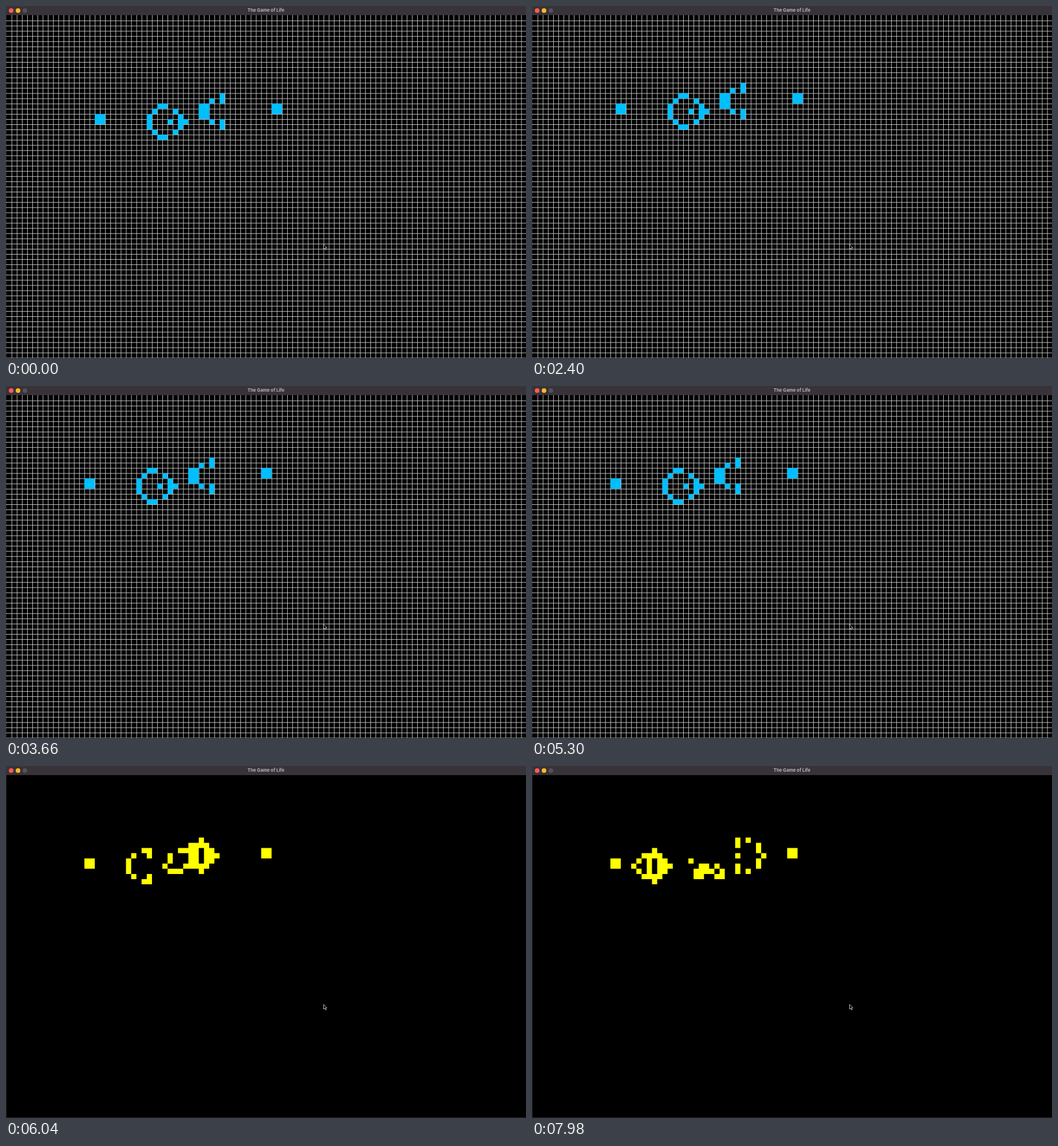
An HTML page with a canvas that plays this animation: 908 px wide and 616 px high, repeating every 8000 ms.

```html
<!DOCTYPE html>
<html lang="en">
<head>
<meta charset="utf-8">
<title>The Game of Life</title>
<style>
  html, body { margin: 0; width: 100%; height: 100%; overflow: hidden; background: #000; }
  canvas { display: block; }
  .bar {
    position: absolute; left: 0; top: 0; width: 908px; height: 16px;
    background: #383239; color: #b9b4b9;
    font: 700 7.8px/15px Inter, "Open Sans", sans-serif; text-align: center;
  }
  .bar i { position: absolute; top: 4px; width: 7.6px; height: 7.6px; border-radius: 50%; }
  svg { position: absolute; left: 553px; top: 416px; }
</style>
</head>
<body>
<canvas width="908" height="616"></canvas>
<div class="bar">
  <i style="left:5.2px;background:#ff5b51"></i>
  <i style="left:17.2px;background:#fcb827"></i>
  <i style="left:29.2px;background:#565156"></i>
  The Game of Life
</div>
<svg width="9" height="13" viewBox="0 0 9 13">
  <path d="M1.5 1.2V9.4L3.4 7.8L4.8 10.8L6.3 10.1L4.9 7.2H7.3Z" fill="#000" stroke="#e8e8e8" stroke-width=".8"/>
</svg>
<script>
const WIDTH = 908, HEIGHT = 616, BAR = 16;
const LOOP = 8000, RUN_AT = 5340, TICK = 200;
const CELL = 9.08, LEFT = 0.66, TOP = 16.38, LINE = 0.9;
const NUDGES = [640, 1040, 1360, 2860, 3460]; // alternately up and left
const ctx = document.querySelector('canvas').getContext('2d');

function rect(x, y, w, h) {
  return Array.from({ length: w * h }, (_, i) => [x + i % w, y + Math.floor(i / w)]);
}

// Circle of radius 3 with a gap right of its top and bottom
function ring(cx, cy) {
  return rect(-3, -3, 7, 7)
    .filter(([x, y]) => Math.round(Math.hypot(x, y)) === 3 && !(x === 1 && Math.abs(y) === 3))
    .map(([x, y]) => [cx + x, cy + y]);
}

function gliderGun() {
  const arm = side => [[22, 3 + 2 * side], [24, 3 + 2 * side], [24, 3 + 3 * side]];
  return [
    ...rect(0, 4, 2, 2), ...rect(34, 2, 2, 2),
    ...ring(13, 5), [14, 5], [17, 5],
    ...rect(20, 2, 2, 3), ...arm(-1), ...arm(1)
  ];
}

function evolve(cells) {
  const counts = new Map(), live = new Set(cells.map(String));
  for (const [x, y] of cells)
    for (const [nx, ny] of rect(x - 1, y - 1, 3, 3))
      if (nx !== x || ny !== y) {
        const key = `${nx},${ny}`;
        counts.set(key, (counts.get(key) || 0) + 1);
      }
  return [...counts]
    .filter(([key, n]) => n === 3 || (n === 2 && live.has(key)))
    .map(([key]) => key.split(',').map(Number));
}

const generations = [gliderGun()];
while (generations.length <= (LOOP - RUN_AT) / TICK + 1) generations.push(evolve(generations.at(-1)));

function drawGrid() {
  ctx.fillStyle = '#d4d4d4';
  for (let x = LEFT + CELL; x < WIDTH; x += CELL) ctx.fillRect(x, BAR, LINE, HEIGHT);
  for (let y = TOP + CELL; y < HEIGHT; y += CELL) ctx.fillRect(0, y, WIDTH, LINE);
}

function draw(t) {
  const running = t >= RUN_AT;
  const generation = running ? Math.floor((t - RUN_AT) / TICK) + 1 : 0;
  const nudges = NUDGES.filter(at => t >= at).length;
  const left = 17 - Math.floor(nudges / 2), top = 15 - Math.ceil(nudges / 2);

  ctx.fillStyle = '#262626';
  ctx.fillRect(0, 0, WIDTH, HEIGHT);
  ctx.fillStyle = '#000';
  ctx.fillRect(1, BAR, WIDTH, HEIGHT - BAR - 1);
  if (!running) drawGrid();

  // One path keeps touching cells free of seams
  ctx.fillStyle = running ? '#ffff00' : '#00bfff';
  ctx.beginPath();
  for (const [x, y] of generations[generation])
    ctx.rect(LEFT + (left + x) * CELL, TOP + (top + y) * CELL, CELL, CELL);
  ctx.fill();
}

function frame() {
  draw(performance.now() % LOOP);
  requestAnimationFrame(frame);
}
frame();
</script>
</body>
</html>
```
